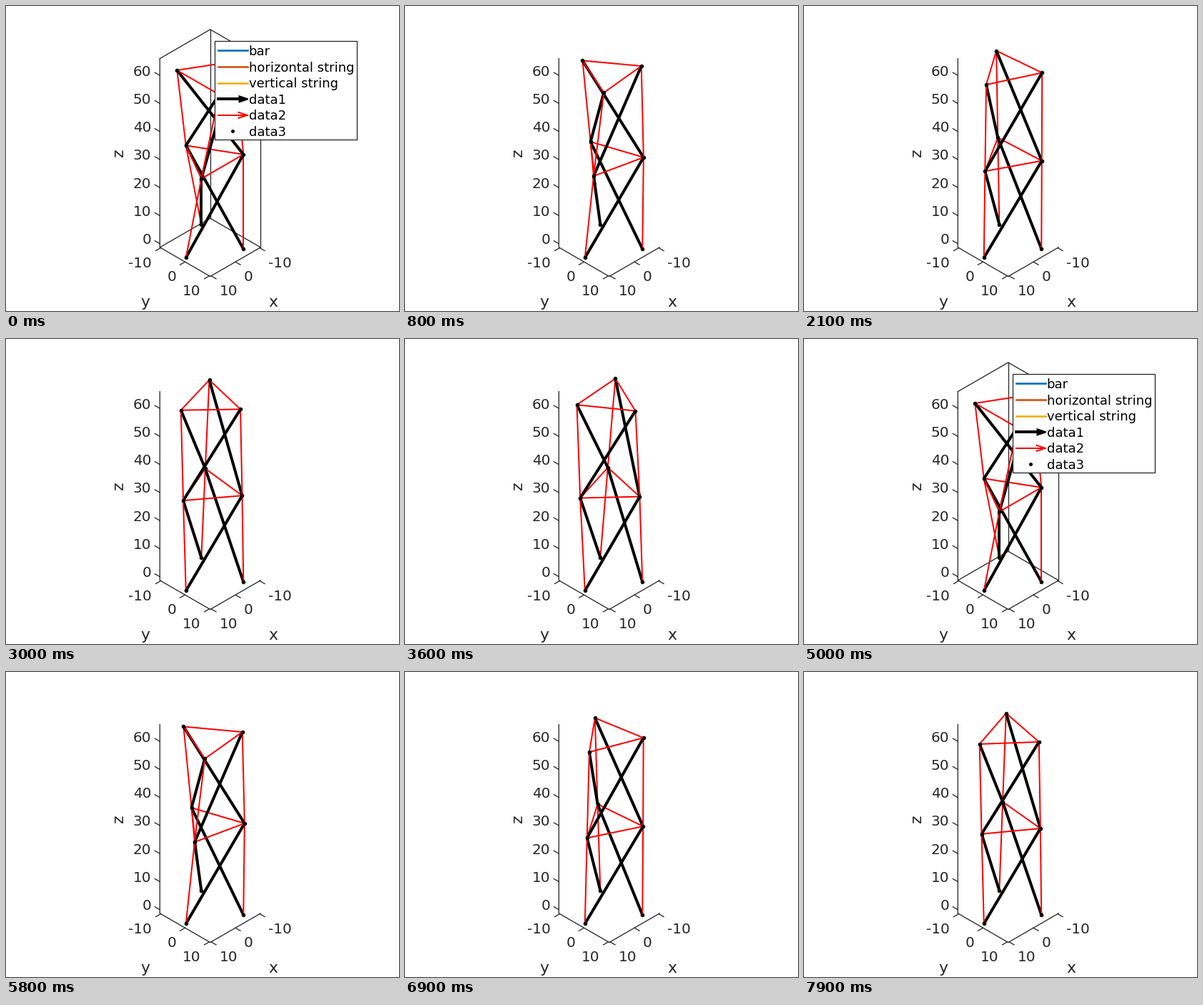
A matplotlib script that plays this animation: 550 by 427 pixels, repeating every 8 s.

```python
import numpy as np
import matplotlib.pyplot as plt
from matplotlib.animation import FuncAnimation
from matplotlib.patches import Polygon, Rectangle

W, H, DPI = 550, 427, 100
FRAMES, CYCLE = 80, 50
INK = "#262626"
PT = 72 / DPI                       # points per pixel

CENTER = np.array([285.3, 332.3])   # screen position of the 3D origin
SCALE = 4.81                        # pixels per unit, seen along (1, 1, 1)
R, H0, RISE = 10, 30, 2.5           # radius, first stage height, growth
BAR2 = H0**2 + 2 * R**2 * (1 - np.cos(np.radians(150)))
LIM, ZMIN, ZMAX = 10.36, -1.3, 66

plt.rcParams["font.family"] = "DejaVu Sans"
# the small margin keeps the pixel size from rounding down
fig = plt.figure(figsize=((W + 0.01) / DPI, (H + 0.01) / DPI), dpi=DPI,
                 facecolor="white")
ax = fig.add_axes([0, 0, 1, 1])
ax.set_xlim(-0.5, W - 0.5)
ax.set_ylim(H - 0.5, -0.5)
ax.axis("off")


def project(p):
    x, y, z = np.moveaxis(np.asarray(p, float), -1, 0)
    u = (y - x) / np.sqrt(2)
    v = (x + y - 2 * z) / np.sqrt(6)
    return CENTER + SCALE * np.stack([u, v], axis=-1)


def line(pts, color=INK, width=1.3, z=0, **kw):
    pts = np.asarray(pts, float)
    return ax.plot(pts[:, 0], pts[:, 1], color=color, lw=width * PT,
                   zorder=z, **kw)[0]


def label(x, y, s, size=20, color=INK, z=1, **kw):
    return ax.text(x, y, s, fontsize=size * PT, color=color, zorder=z, **kw)


def draw_axes():
    line(project([(LIM, -LIM, ZMAX), (LIM, -LIM, ZMIN), (LIM, LIM, ZMIN),
                  (-LIM, LIM, ZMIN)]))
    for v in (-10, 0, 10):
        p = project((LIM, v, ZMIN))
        line([p, p + (-7, 4)])
        label(p[0] - 12.5, p[1] + 27, str(v), ha="right")
        p = project((v, LIM, ZMIN))
        line([p, p + (7, 4)])
        label(p[0] + 12, p[1] + 27, str(v), ha="left")
    for v in range(0, 61, 10):
        p = project((LIM, -LIM, v))
        line([p, p + (-7, -4)])
        label(p[0] - 12, p[1] + 0.5, str(v), ha="right")
    label(373, 420, "x", 22, ha="center")
    label(194, 420, "y", 22, ha="center")
    label(157, 205, "z", 22, ha="center", va="center", rotation=90)


def draw_box():
    a, b, c = (LIM, -LIM), (-LIM, -LIM), (-LIM, LIM)
    top = project([(*q, ZMAX) for q in (a, b, c)])
    low = project([(*q, ZMIN) for q in (a, b, c)])
    return [line(top), line(low), line([top[1], low[1]]), line([top[2], low[2]])]


def draw_legend():
    z = 1000
    parts = [ax.add_patch(Rectangle((291.5, 49), 199, 138, fc="white", ec=INK,
                                    lw=1.3 * PT, zorder=z))]
    names = ("bar", "horizontal string", "vertical string",
             "data1", "data2", "data3")
    rows = 62 + 22.6 * np.arange(6)
    for y, name in zip(rows, names):
        parts.append(label(339, y + 6.5, name, 18, "black", z + 1))
    for y, color in zip(rows, ("#0072BD", "#D95319", "#EDB120")):
        parts.append(line([(296.5, y), (337, y)], color, 2.7, z + 1))
    y = rows[3]
    parts.append(line([(296.5, y), (328, y)], "black", 4, z + 1))
    parts.append(ax.add_patch(Polygon(
        [(326, y - 4), (338, y), (326, y + 4)], fc="black", ec="black",
        lw=2 * PT, zorder=z + 1)))
    y = rows[4]
    parts.append(line([(296.5, y), (337, y)], "red", 2, z + 1))
    parts.append(line([(325, y - 4), (337, y), (325, y + 4)], "red", 2, z + 1))
    parts.append(line([(316, rows[5])], "black", 1, z + 1, marker="o",
                      ms=5 * PT, mew=0))
    return parts


# Nodes 0-2 base, 3-5 middle, 6-8 top.
bars, strings = [], []
for k in range(3):
    for low in (0, 3):
        bars.append((low + k, low + 3 + (k + 1) % 3))
        strings.append((low + k, low + 3 + k))
        strings.append((low + 3 + k, low + 3 + (k + 1) % 3))

draw_axes()
start_parts = draw_box() + draw_legend()
links = [(pair, line([(0, 0), (1, 1)], "black", 4, solid_capstyle="butt"))
         for pair in bars]
links += [(pair, line([(0, 0), (1, 1)], "red", 2, solid_capstyle="butt"))
          for pair in strings]
dots = line([(0, 0)], "black", 0, 500, marker="o", ms=5.6 * PT, mew=0)


def nodes(step):
    h = H0 + RISE * step / (CYCLE - 1)
    # the twist that keeps the bar length constant at this height
    twist = np.arccos(1 - (BAR2 - h**2) / (2 * R**2)) - np.radians(120)
    level = np.repeat(np.arange(3), 3)
    ang = np.tile(np.radians([0, 120, 240]), 3) + level * twist
    return np.column_stack([R * np.cos(ang), R * np.sin(ang), level * h])


def update(i):
    step = i % CYCLE
    p = nodes(step)
    xy, depth = project(p), p.sum(axis=1)
    for (a, b), ln in links:
        ln.set_data(xy[[a, b], 0], xy[[a, b], 1])
        ln.set_zorder(100 + (depth[a] + depth[b]) / 2)
    dots.set_data(xy[:, 0], xy[:, 1])
    for part in start_parts:
        part.set_visible(step == 0)
    return []


anim = FuncAnimation(fig, update, frames=FRAMES, interval=100,
                     repeat=True, repeat_delay=0, blit=False)
plt.show()
```
